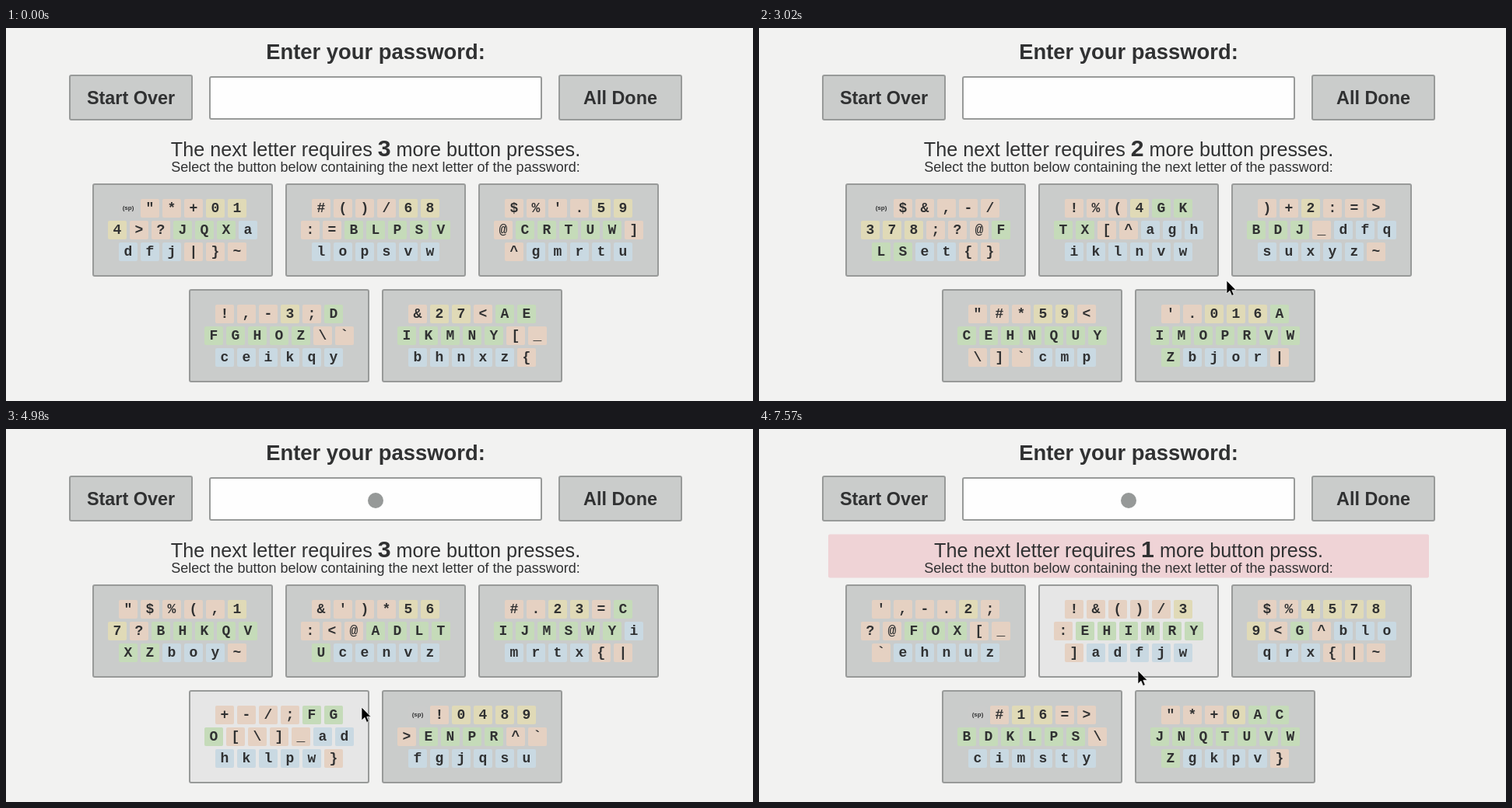
An HTML page that plays this animation: 960 px wide and 480 px high, repeating every 8 s.

```html
<!DOCTYPE html>
<html lang="en">
<head>
<meta charset="utf-8">
<title>Password entry by button groups</title>
<style>
  html, body { margin: 0; width: 100%; height: 100%; overflow: hidden; background: #f2f2f1; }
  svg { display: block; width: 960px; height: 480px; }
  text { font-family: "Liberation Sans", Arial, sans-serif; fill: #303132; text-anchor: middle; }
  .bold, .count { font-weight: bold; }
  .lead { font-size: 25.2px; }
  .count { font-size: 30.24px; }
  .frame { fill: #cacccb; stroke: #989a99; stroke-width: 2; }
  .frame.hover { fill: #e6e6e6; }
  .key { font: bold 18px "Liberation Mono", "Courier New", monospace; }
  .key.space { font: bold 8px "Liberation Sans", Arial, sans-serif; }
</style>
</head>
<body>
<svg viewBox="0 0 960 480">
  <rect width="960" height="480" fill="#f2f2f1"/>
  <text class="bold" x="475" y="40" font-size="27.4">Enter your password:</text>
  <rect class="frame" x="82" y="61" width="157" height="57" rx="2"/>
  <text class="bold" x="160.5" y="98" font-size="23.4">Start Over</text>
  <rect class="frame" x="262" y="63" width="426" height="54" rx="2" style="fill:#fefefe"/>
  <circle id="dot" cx="475" cy="92" r="10" fill="#969998"/>
  <rect class="frame" x="711" y="61" width="157" height="57" rx="2"/>
  <text class="bold" x="789.5" y="98" font-size="23.4">All Done</text>
  <rect id="banner" x="89" y="135.5" width="772" height="56" rx="2" fill="#efd3d6"/>
  <text class="lead" x="475" y="165">The next letter requires <tspan class="count" id="count"></tspan> more button <tspan id="noun"></tspan></text>
  <text x="475" y="185" font-size="18">Select the button below containing the next letter of the password:</text>
  <g id="board"></g>
  <path id="cursor" d="M0 0V17L4 13.3L6.6 19.4L9.3 18.3L6.8 12.3H12Z" fill="#000" stroke="#fff" stroke-width=".7"/>
  <circle id="press" r="12.2" fill="#a070dd" opacity=".75"/>
</svg>
<script>
const LOOP = 8000;
const $ = id => document.getElementById(id);

// Each screen deals the 95 printable characters into five sorted groups.
const screens = [
  { at: 0, left: 3, groups: [
    " \"*+014>?JQXadfj|}~", "#()/68:=BLPSVlopsvw", "$%'.59@CRTUW]^gmrtu",
    "!,-3;DFGHOZ\\`ceikqy", "&27<AEIKMNY[_bhnxz{"] },
  { at: 2110, left: 2, groups: [
    " $&,-/378;?@FLSet{}", "!%(4GKTX[^aghiklnvw", ")+2:=>BDJ_dfqsuxyz~",
    "\"#*59<CEHNQUY\\]`cmp", "'.016AIMOPRVWZbjor|"] },
  { at: 3560, left: 1, groups: [
    "%,.7:CGIKUVWZ]cmty|", "!#$*+9@RXY[`ejruw}~", "\"24<>BDFHPS_adloqsv",
    "&(-368=?AEJLNQ^bhip", " ')/015;MOT\\fgknxz{"] },
  { at: 4980, left: 3, typed: true, groups: [
    "\"$%(,17?BHKQVXZboy~", "&')*56:<@ADLTUcenvz", "#.23=CIJMSWYimrtx{|",
    "+-/;FGO[\\]_adhklpw}", " !0489>ENPR^`fgjqsu"] },
  { at: 6090, left: 2, typed: true, groups: [
    " !&+.27:=ADMS^bgmv{", "#(,058;BHKOT[cjnrx|", "\"%*14<CFLPUX]ekoqy}",
    "$'-3?@EINQVY_adhls~", ")/69>GJRWZ\\`fiptuwz"] },
  { at: 7570, left: 1, typed: true, groups: [
    "',-.2;?@FOX[_`ehnuz", "!&()/3:EHIMRY]adfjw", "$%45789<G^bloqrx{|~",
    " #16=>BDKLPS\\cimsty", "\"*+0ACJNQTUVWZgkpv}"] }
];

// Cursor moves: first step, last step, step count, end point.
const origin = [894, 476];
const moves = [
  [1000, 1800, 11, [694, 433]],
  [2690, 3160, 7, [587, 309]],
  [4060, 4670, 9, [457, 358]],
  [5480, 5790, 5, [498, 347]],
  [6780, 7110, 5, [487, 313]],
  [7250, 7250, 1, [487, 311]]
];
const presses = [[2020, 2190], [3480, 3560], [4900, 4980], [5950, 6090], [7500, 7570]];
const spots = [[111, 200], [359, 200], [607, 200], [235, 336], [483, 336]];

function add(tag, attrs) {
  const el = document.createElementNS("http://www.w3.org/2000/svg", tag);
  for (const name in attrs) el.setAttribute(name, attrs[name]);
  return $("board").appendChild(el);
}

// Rows hold 6, 7 and 6 keys, each row centred in its button.
function keyPlace(i) {
  const row = i < 6 ? 0 : i < 13 ? 1 : 2;
  const col = i - [0, 6, 13][row];
  return [col * 28 + (row === 1 ? 32 : 46), row * 28 + 20];
}

const buttons = spots.map(([x, y]) => {
  const frame = add("rect", { class: "frame", x: x + 1, y: y + 1, width: 230, height: 118, rx: 2 });
  const keys = Array.from({ length: 19 }, (_, i) => {
    const [dx, dy] = keyPlace(i);
    const tile = add("rect", { x: x + dx - 12, y: y + dy, width: 24, height: 24, rx: 2 });
    const label = add("text", { x: x + dx });
    return { tile, label, top: y + dy };
  });
  return { x, y, frame, keys };
});

function tint(ch) {
  if (ch === " ") return "#cbcccb";
  if (/\d/.test(ch)) return "#e0dab7";
  if (/[A-Z]/.test(ch)) return "#c5dbb9";
  if (/[a-z]/.test(ch)) return "#c9d9e2";
  return "#e5d1c2";
}

let shown;
function showScreen(screen) {
  if (screen === shown) return;
  shown = screen;
  $("count").textContent = screen.left;
  $("noun").textContent = screen.left === 1 ? "press." : "presses.";
  $("banner").style.display = screen.left === 1 ? "" : "none";
  $("dot").style.display = screen.typed ? "" : "none";
  buttons.forEach(({ keys }, b) => keys.forEach(({ tile, label, top }, i) => {
    const ch = screen.groups[b][i], space = ch === " ";
    tile.setAttribute("fill", tint(ch));
    label.textContent = space ? "(sp)" : ch;
    label.setAttribute("class", space ? "key space" : "key");
    label.setAttribute("y", top + (space ? 14 : 16.5));
  }));
}

function cursorAt(t) {
  let pos = origin;
  for (const [start, end, steps, to] of moves) {
    if (t < start) break;
    const gap = (end - start) / (steps - 1) || 1;
    const step = Math.min(steps, Math.floor((t - start) / gap + 0.05) + 1);
    const p = 1 - (1 - step / steps) ** 1.65;
    pos = pos.map((v, i) => v + (to[i] - v) * p);
  }
  return pos.map(Math.round);
}

function draw(t) {
  showScreen(screens.filter(s => s.at <= t).pop());
  const [x, y] = cursorAt(t);
  const move = `translate(${x} ${y})`;
  const pressed = presses.some(([from, to]) => t >= from && t < to);
  $("cursor").setAttribute("transform", move);
  $("press").setAttribute("transform", move);
  $("cursor").style.display = t < moves[0][0] ? "none" : "";
  $("press").style.display = pressed ? "" : "none";
  for (const b of buttons) {
    const over = x >= b.x && x < b.x + 232 && y >= b.y && y < b.y + 120;
    b.frame.classList.toggle("hover", over);
  }
}

const began = performance.now();
function tick() {
  draw((performance.now() - began) % LOOP);
  requestAnimationFrame(tick);
}
tick();
</script>
</body>
</html>
```
